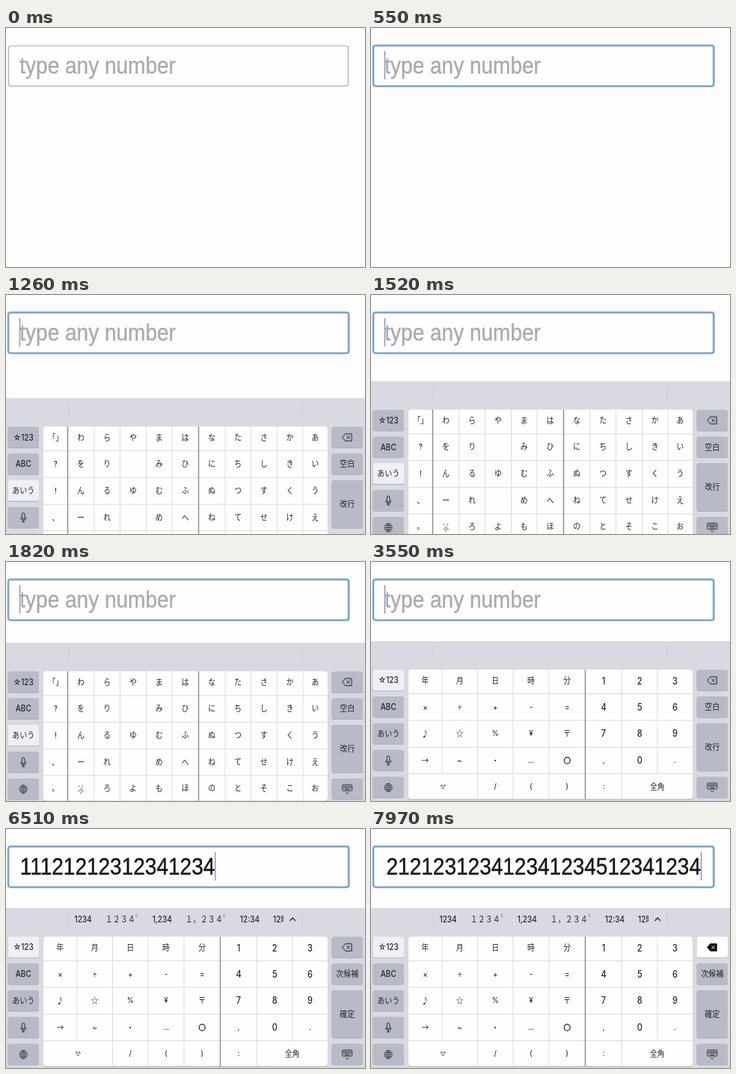
An HTML page with a canvas that plays this animation: 480 px wide and 320 px high, repeating every 8 s.

```html
<!DOCTYPE html>
<html lang="ja">
<head>
<meta charset="utf-8">
<title>Number input</title>
<style>
  html, body { margin: 0; width: 100%; height: 100%; overflow: hidden; background: #fefdfe; }
  canvas { display: block; }
</style>
</head>
<body>
<canvas id="stage" width="480" height="320"></canvas>
<script>
const ctx = document.getElementById('stage').getContext('2d');
const LOOP = 8000;
const ASPECT = 1.13;
const UI = 'Inter, "Noto Sans CJK JP", "Noto Sans CJK", sans-serif';
const CJK = '"Noto Sans CJK JP", "Noto Sans CJK", sans-serif';
const FIELD = '"Liberation Sans", Arial, sans-serif';
const INK = '#24252a', LINE = '#dcdce1', THICK = '#8e8f95';
const DARK_KEY = '#b8bac5', LIGHT_KEY = '#eff0f6';

const KEYBOARD_TOP = 106, SLIDE_START = 859, SLIDE_TAU = 212;
const SWITCH_DOWN = 2690, SWITCH = 3100, DELETE_DOWN = 7300;

// Each entry appends the current composition to the field.
const typed = [
  [3610, '1'], [3810, '1'], [4210, '12'], [4440, '12'], [4990, '123'],
  [5660, '1234'], [6340, '1234'], [6610, '12345'], [7400, '1234'], [7970, '1234']
];
const presses = [[3580, '1'], [4150, '2'], [4930, '3'], [5590, '4'], [6550, '5']];
const PRESS_MS = 170;

const candidates = {
  '1': ['1', '１*', '一', '①', '1月', '1日', '1時', '1分'],
  '12': ['12', '１２*', '十二', '1:2', '12月', '12日', '12時'],
  '123': ['123', '１２３*', '百二十三', '1:23', '1月23日'],
  '1234': ['1234', '１２３４*', '1,234', '１，２３４*', '12:34', '12時34分'],
  '12345': ['12345', '１２３４５*', '12,345', '１２，３４５*', '1:23:45']
};

const kana = {
  edges: [50, 82.5, 118, 152.5, 187.5, 222, 257.5, 293, 327.5, 362.5, 397, 430],
  thick: [1, 6],
  rows: ['「」|わ|ら|や|ま|は|な|た|さ|か|あ', '?|を|り||み|ひ|に|ち|し|き|い',
    '!|ん|る|ゆ|む|ふ|ぬ|つ|す|く|う', '、|ー|れ||め|へ|ね|て|せ|け|え',
    '。|小|ろ|よ|も|ほ|の|と|そ|こ|お']
};
const digits = {
  edges: [50, 95, 142.5, 190, 238, 286.5, 335.5, 383, 430],
  thick: [5],
  rows: ['年|月|日|時|分|1|2|3', '×|÷|+|-|=|4|5|6', '♪|☆|%|¥|〒|7|8|9',
    '→|~|・|...|○|,|0|.', '^^||/|(|)|:|全角|'],
  merged: [1, 7]
};
const rowEdges = [38, 70.5, 106, 142, 177.5, 211.5];
const rowCenters = [53, 88, 123.7, 159.7, 194.7];
const KEY_HEIGHT = 28;

const clamp = v => Math.max(0, Math.min(1, v));

function text(str, x, y, size, { font = UI, color = INK, align = 'center', weight = 500, bold = 0 } = {}) {
  ctx.save();
  ctx.translate(x, y);
  ctx.scale(1, ASPECT);
  ctx.font = `${weight} ${size}px ${font}`;
  ctx.textAlign = align;
  ctx.fillStyle = ctx.strokeStyle = color;
  ctx.lineWidth = bold;
  ctx.fillText(str, 0, size * 0.365);
  if (bold) ctx.strokeText(str, 0, size * 0.365);
  const width = ctx.measureText(str).width;
  ctx.restore();
  return width;
}

function roundRect(x, y, w, h, r) {
  ctx.beginPath();
  ctx.roundRect(x, y, w, h, r);
}

function line(x1, y1, x2, y2, color, width = 1) {
  path([[x1, y1], [x2, y2]], color, width);
}

function path(points, color = INK, width = 1, close = false) {
  ctx.beginPath();
  points.forEach(([x, y]) => ctx.lineTo(x, y));
  if (close) ctx.closePath();
  ctx.strokeStyle = color;
  ctx.lineWidth = width;
  ctx.stroke();
}

function key(x, y, h, label, color = DARK_KEY) {
  roundRect(x, y + 0.8, 41.5, h, 3);
  ctx.fillStyle = '#a6a8b1';
  ctx.fill();
  roundRect(x, y, 41.5, h, 3);
  ctx.fillStyle = color;
  ctx.fill();
  if (label) text(label, x + 20.75, y + h / 2, 10);
}

function drawField(t) {
  const focus = clamp((t - 380) / 170);
  ctx.save();
  ctx.shadowColor = 'rgba(90,90,100,.25)';
  ctx.shadowBlur = 2;
  ctx.shadowOffsetY = 1;
  roundRect(3.5, 24, 454, 53.5, 2.5);
  ctx.fillStyle = '#fefefe';
  ctx.fill();
  ctx.restore();
  ctx.strokeStyle = '#adaeb3';
  ctx.lineWidth = 1.2;
  ctx.stroke();
  if (focus) {
    ctx.save();
    ctx.globalAlpha = focus;
    roundRect(3, 23.3, 455.4, 54.6, 3);
    ctx.strokeStyle = 'rgba(150,190,230,.45)';
    ctx.lineWidth = 3.4;
    ctx.stroke();
    ctx.strokeStyle = '#6c9bd0';
    ctx.lineWidth = 1.7;
    ctx.stroke();
    ctx.restore();
  }

  const value = typed.filter(([at]) => t >= at).map(([, piece]) => piece).join('');
  const style = { font: FIELD, align: 'left', weight: 400, bold: 0.35 };
  let caret = 18.5;
  ctx.save();
  ctx.beginPath();
  ctx.rect(19.5, 26, 424, 50);
  ctx.clip();
  if (value) {
    ctx.font = `28px ${FIELD}`;
    const width = ctx.measureText(value).width;
    const x = Math.min(18.7, 441 - width);
    text(value, x, 49.2, 28, { ...style, color: '#141416' });
    caret = x + width + 0.5;
  } else {
    ctx.restore();
    ctx.save();
    text('type any number', 18.3, 49.2, 28, { ...style, color: '#aaaaae' });
  }
  ctx.restore();
  if (t >= 480) line(caret, 31, caret, 69, '#7393c4', 1.3);
}

function drawCandidates(list) {
  ctx.save();
  ctx.beginPath();
  ctx.rect(85, 0, 286, 36);
  ctx.clip();
  let x = 91.5;
  for (const item of list) {
    const marked = item.endsWith('*');
    const label = item.replace('*', '');
    x += text(label, x, 14.8, 10, { align: 'left', font: marked ? CJK : UI, weight: marked ? 400 : 500 });
    if (marked) {
      text('全', x + 2, 9.5, 4, { color: '#85868d' });
      x += 5;
    }
    x += 18;
  }
  ctx.restore();
  path([[379.5, 17], [383.2, 13], [387, 17]], INK, 1.2);
}

function drawGrid({ edges, thick, rows, merged = [] }, pressed) {
  const bottom = rowEdges[5];
  roundRect(50, 39, 380, bottom - 38, 4);
  ctx.fillStyle = '#a9abb3';
  ctx.fill();
  roundRect(50, 38, 380, bottom - 38, 4);
  ctx.fillStyle = '#fefefe';
  ctx.fill();

  const cells = rows.map(row => row.split('|'));
  cells.forEach((row, r) => row.forEach((label, c) => {
    if (label && label === pressed) {
      ctx.fillStyle = '#c9cad2';
      ctx.fillRect(edges[c], rowEdges[r], edges[c + 1] - edges[c], rowEdges[r + 1] - rowEdges[r]);
    }
  }));
  rowEdges.slice(1, -1).forEach(y => line(50, y, 430, y, LINE));
  edges.slice(1, -1).forEach((x, i) => {
    const col = i + 1, heavy = thick.includes(col);
    const end = merged.includes(col) ? rowEdges[4] : bottom;
    line(x, 38, x, end, heavy ? THICK : LINE, heavy ? 1.5 : 1);
  });

  cells.forEach((row, r) => row.forEach((label, c) => {
    if (!label) return;
    const wide = r === 4 && merged.includes(c + 1);
    const x = (edges[c] + edges[c + (wide ? 2 : 1)]) / 2, y = rowCenters[r];
    if (label === '小') {
      text('゛', x, y + 1, 8, { font: CJK });
      text('゜', x + 5, y + 1, 8, { font: CJK });
      text('小', x, y + 3, 7, { font: CJK });
    } else if (label === '^^') {
      text('^^', x, y, 8);
      path([[x - 2, y + 2], [x + 2, y + 2]], INK, 0.8);
    } else if (label === '○') {
      ctx.beginPath();
      ctx.ellipse(x, y, 4, 4.4, 0, 0, Math.PI * 2);
      ctx.strokeStyle = INK;
      ctx.lineWidth = 1.2;
      ctx.stroke();
    } else if (/\d/.test(label)) {
      text(label, x, y, 11);
    } else {
      const small = /[×÷+\-=%¥~,.:\/()?!]/.test(label);
      text(label, x, y, small ? 9 : 9.8, { font: small ? UI : CJK });
    }
  }));
}

function drawDelete(x, y, filled) {
  path([[x - 6.5, y], [x - 2.5, y - 4.8], [x + 6, y - 4.8], [x + 6, y + 4.8], [x - 2.5, y + 4.8]], INK, 1, true);
  if (filled) {
    ctx.fillStyle = '#08080a';
    ctx.fill();
  }
  const cross = filled ? '#fff' : INK;
  line(x - 0.7, y - 2.2, x + 3.3, y + 2.2, cross);
  line(x - 0.7, y + 2.2, x + 3.3, y - 2.2, cross);
}

function drawMic(x, y) {
  roundRect(x - 1.8, y - 6, 3.6, 8, 1.8);
  ctx.strokeStyle = INK;
  ctx.lineWidth = 1;
  ctx.stroke();
  ctx.beginPath();
  ctx.arc(x, y, 3.7, 0, Math.PI);
  ctx.stroke();
  line(x, y + 3.7, x, y + 6, INK);
  line(x - 2, y + 6, x + 2, y + 6, INK);
}

function drawGlobe(x, y) {
  ctx.strokeStyle = INK;
  ctx.lineWidth = 0.65;
  for (const rx of [5, 2.3]) {
    ctx.beginPath();
    ctx.ellipse(x, y, rx, 5.6, 0, 0, Math.PI * 2);
    ctx.stroke();
  }
  line(x, y - 5.6, x, y + 5.6, INK, 0.65);
  [[-2.8, 4.3], [0, 5], [2.8, 4.3]].forEach(([dy, w]) => line(x - w, y + dy, x + w, y + dy, INK, 0.65));
}

function drawDismiss(x, y) {
  roundRect(x - 6.5, y - 6, 13, 8, 1);
  ctx.strokeStyle = INK;
  ctx.lineWidth = 0.9;
  ctx.stroke();
  ctx.fillStyle = INK;
  for (let row = 0; row < 2; row++)
    for (let i = 0; i < 5; i++) ctx.fillRect(x - 5.2 + i * 2.2, y - 4.5 + row * 2, 1.5, 1.3);
  line(x - 3, y + 0.3, x + 3, y + 0.3, INK);
  path([[x - 2.2, y + 4], [x, y + 6], [x + 2.2, y + 4]], INK, 0.9);
}

function drawKeyboard(t) {
  const remain = Math.exp(-(t - SLIDE_START) / SLIDE_TAU);
  const last = typed.filter(([at]) => t >= at).pop();
  const press = presses.find(([at]) => t >= at && t < at + PRESS_MS);
  const numeric = t >= SWITCH, deleting = t >= DELETE_DOWN;
  ctx.save();
  ctx.translate(0, KEYBOARD_TOP + (320 - KEYBOARD_TOP) * remain);
  ctx.fillStyle = '#d9dae1';
  ctx.fillRect(0, 0, 480, 216);
  line(83.5, 6, 83.5, 25, '#cbccd3');
  line(396, 6, 396, 25, '#cbccd3');
  if (last) drawCandidates(candidates[last[1]]);

  key(2.5, 38.3, KEY_HEIGHT, '☆123', t >= SWITCH_DOWN ? LIGHT_KEY : DARK_KEY);
  key(2.5, 74, KEY_HEIGHT, 'ABC');
  key(2.5, 109.7, KEY_HEIGHT, 'あいう', numeric ? DARK_KEY : LIGHT_KEY);
  key(2.5, 145.5, KEY_HEIGHT);
  key(2.5, 181.5, KEY_HEIGHT);
  drawMic(23.2, 159.7);
  drawGlobe(23.2, 196);

  drawGrid(numeric ? digits : kana, press && press[1]);

  key(435.5, 38.3, KEY_HEIGHT, '', deleting ? '#fefefe' : DARK_KEY);
  key(435.5, 74, KEY_HEIGHT, last ? '次候補' : '空白');
  key(435.5, 109.7, 64, last ? '確定' : '改行');
  key(435.5, 181.5, KEY_HEIGHT);
  drawDelete(456.2, 52.5, deleting);
  drawDismiss(456.2, 196);
  ctx.restore();
}

function frame(now) {
  const t = now % LOOP;
  ctx.fillStyle = '#fefdfe';
  ctx.fillRect(0, 0, 480, 320);
  drawField(t);
  if (t >= SLIDE_START) drawKeyboard(t);
  requestAnimationFrame(frame);
}
requestAnimationFrame(frame);
</script>
</body>
</html>
```
